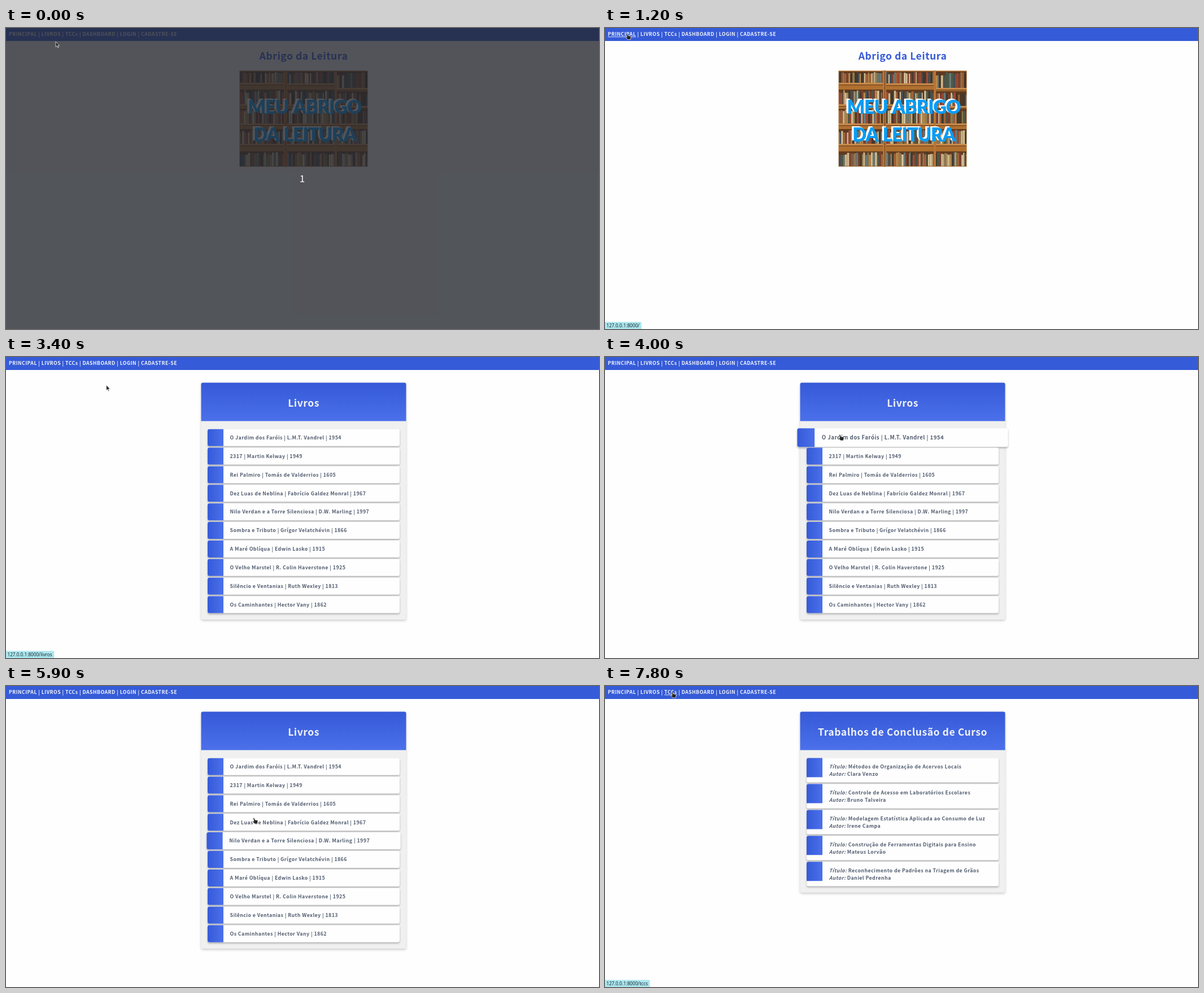
These frames come from a looping animation (1050 by 533 pixels, 8000 ms). An HTML page:

```html
<!DOCTYPE html>
<html lang="pt-BR">
<head>
<meta charset="utf-8">
<title>Abrigo da Leitura</title>
<style>
  html, body { margin: 0; width: 100%; height: 100%; overflow: hidden; background: #fefefe; }
  svg { display: block; }
  text { font: 600 8.75px "Noto Sans CJK JP", "Noto Sans CJK SC", sans-serif; letter-spacing: .45px; fill: #525d6f; white-space: pre; }
  .title { font-size: 17.5px; font-weight: 700; letter-spacing: .547px; text-anchor: middle; fill: #f0f2f7; }
  .home { fill: #3559d6; }
  #nav text { fill: #f2f4fb; }
  .cover { font: 900 33px Lato, sans-serif; letter-spacing: -1.2px; word-spacing: 3px; text-anchor: middle; fill: #fff; }
  .cover.front { fill: #0a9cf5; }
  .row { filter: drop-shadow(0 2px 1.5px rgba(0, 0, 0, .27)); }
  .panel { filter: drop-shadow(0 2px 2px rgba(0, 0, 0, .2)); }
  .count { font-size: 17px; font-weight: 400; text-anchor: middle; fill: #fff; }
  #status text { font: 400 8.2px "Noto Sans", sans-serif; letter-spacing: 0; fill: #1c2a30; }
  #cursor path { fill: #262626; stroke: #fff; stroke-width: .7; stroke-linejoin: round; }
</style>
</head>
<body>
<svg id="stage" width="1050" height="533" viewBox="0 0 1050 533"></svg>
<script>
const LOOP = 8000, TICK = 100, MID = 527;
const $ = id => document.getElementById(id);
const rect = (x, y, w, h, fill, rx = 0) =>
  `<rect x="${x}" y="${y}" width="${w}" height="${h}" rx="${rx}" fill="${fill}"/>`;
const text = (x, y, s, cls = '') => `<text x="${x}" y="${y}" class="${cls}">${s}</text>`;

const links = [['PRINCIPAL', 5, 55], ['LIVROS', 63, 97], ['TCCs', 105, 128],
  ['DASHBOARD', 135, 194], ['LOGIN', 201, 231], ['CADASTRE-SE', 238, 303]];

const books = [
  'O Jardim dos Faróis | L.M.T. Vandrel | 1954',
  '2317 | Martin Kelway | 1949',
  'Rei Palmiro | Tomás de Valderrios | 1605',
  'Dez Luas de Neblina | Fabrício Galdez Monral | 1967',
  'Nilo Verdan e a Torre Silenciosa | D.W. Marling | 1997',
  'Sombra e Tributo | Grígor Velatchévin | 1866',
  'A Maré Oblíqua | Edwin Lasko | 1915',
  'O Velho Marstel | R. Colin Haverstone | 1925',
  'Silêncio e Ventanias | Ruth Wexley | 1813',
  'Os Caminhantes | Hector Vany | 1862'];

const theses = [
  ['Métodos de Organização de Acervos Locais', 'Clara Venzo'],
  ['Controle de Acesso em Laboratórios Escolares', 'Bruno Talveira'],
  ['Modelagem Estatística Aplicada ao Consumo de Luz', 'Irene Campa'],
  ['Construção de Ferramentas Digitais para Ensino', 'Mateus Lorvão'],
  ['Reconhecimento de Padrões na Triagem de Grãos', 'Daniel Pedrenha']];

// Bookcase picture: three columns of shelves filled with seeded books
function bookcase() {
  let seed = 7;
  const rnd = () => (seed = seed * 16807 % 2147483647) / 2147483647;
  const tones = ['#7c4030', '#4d5a48', '#cdb98c', '#44505a', '#a0623a', '#d6c49c',
    '#4a3626', '#8f7c50', '#6b7a78', '#9c4a36', '#3c3a30', '#b5884e'];
  const columns = [[414, 492, 0], [498, 582, 1], [586, 640, 9]];
  const shelves = [97, 135, 169, 205, 244.5];
  let out = rect(413.5, 75.5, 227, 170, '#b0702f');
  for (const [x0, x1, drop] of columns) {
    shelves.forEach((base, k) => {
      const y = base + (k < 2 ? drop / (k * 2 + 1) : 0);
      const tall = k ? 26 : y - 77;
      out += rect(x0, y - tall, x1 - x0, tall, '#5f3a20');
      for (let x = x0; x < x1 - 1;) {
        const w = Math.min(1.8 + rnd() * 2.4, x1 - x), h = tall * (.75 + rnd() * .22);
        const tone = tones[Math.floor(rnd() * tones.length)];
        out += rect(x.toFixed(1), (y - h).toFixed(1), (w - .3).toFixed(1), h.toFixed(1), tone);
        x += w;
      }
      if (k < 4) out += rect(x0, y, x1 - x0, 3, '#c88a4a') + rect(x0, y + 3, x1 - x0, 1.5, '#7a4a22');
    });
  }
  return out + rect(492, 75.5, 6, 170, '#b87436') + rect(495, 75.5, 1, 170, '#70401d') +
    rect(582, 75.5, 4, 170, '#b87436');
}

const cover = (y, s) => text(525.5, y - 1.5, s, 'cover') + text(526.5, y - 1, s, 'cover') +
  text(529, y + .5, s, 'cover front');

const panel = (title, bottom) =>
  `<g class="panel">${rect(345.5, 45.5, 363, bottom - 45.5, '#f0f0f0', 3)}</g>
   <path d="M345.5 113.5V48.5q0-3 3-3H705.5q3 0 3 3V113.5Z" fill="url(#down)"/>` +
  text(MID, 87.5, title, 'title');

// A card centred on its own origin; r rounds the lower corner of the blue block
const card = (y, h, block, r, content) =>
  `<g class="row" transform="translate(${MID} ${y})">${rect(-170, -h / 2, 340, h, '#fefefe', 3)}
   <path d="M-142 ${-h / 2}h-25q-3 0-3 3v${block - 3 - r}q0 ${r} ${r} ${r}H-142Z" fill="url(#across)"/>
   ${content}</g>`;

const rowY = i => 142.7 + 32.88 * i;
const label = (y, name, s) =>
  `<text x="-130.3" y="${y}"><tspan font-style="italic">${name}:</tspan> ${s}</text>`;

const gradient = (id, dir) =>
  `<linearGradient id="${id}" ${dir}><stop stop-color="#365ad8"/><stop offset="1" stop-color="#4b70ea"/></linearGradient>`;

$('stage').innerHTML = `<defs>${gradient('down', 'x2="0" y2="1"')}${gradient('across', '')}</defs>` +
  rect(0, 0, 1050, 533, '#fefefe') +
  `<g id="nav">${rect(0, 0, 1050, 23, '#355bd8')}<text x="5" y="14.3">${
    links.map(([name]) => `<tspan>${name}</tspan>`).join(' | ')}</text></g>` +
  `<g id="home">${text(MID, 56, 'Abrigo da Leitura', 'title home')}${bookcase()}${
    cover(151.5, 'MEU ABRIGO')}${cover(200, 'DA LEITURA')}</g>` +
  `<g id="books">${panel('Livros', 465)}${
    books.map((s, i) => card(rowY(i), 30, 30, 3, text(-130.5, 3.2, s))).join('')}</g>` +
  `<g id="theses">${panel('Trabalhos de Conclusão de Curso', 365.7)}${
    theses.map(([s, who], i) => card(149.2 + 45.9 * i, 43.2, 34, 0,
      label(-3.1, 'Título', s) + label(10, 'Autor', who))).join('')}</g>` +
  `<g id="status"><path fill="#abe6ee"/><text x="2.5" y="530"></text></g>` +
  `<g id="shade">${rect(0, 0, 1050, 533, 'rgba(36,39,46,.79)')}${text(524.7, 273, '1', 'count')}</g>` +
  `<g id="cursor"><path id="arrow" d="M0 0V9.5L2.2 7.6 3.8 11 5.2 10.3 3.7 7.2H6.7Z"/>
   <path id="hand" d="M-.4 1Q.6-.5 1.7 1L2.9 3.9 6.6 4.6Q8.2 5 8 6.8L7 11H2.2L-1.2 7.2Q-1.4 5.9.2 6.2L1 6.6Z"/></g>`;

// Pointer path: time, x, y
const path = [[0, 88, 24], [100, 88, 9.5], [300, 88, 9.5], [500, 70, 5.5], [800, 38, 9.5],
  [1300, 38, 9.5], [1800, 76.5, 9.5], [3300, 76.5, 9.5], [3600, 380, 130], [4000, 415, 137],
  [4200, 418, 140], [4600, 424, 175], [4818, 429, 226], [4857, 430, 259], [5000, 433, 281],
  [5100, 436, 327], [5400, 442, 460], [5858, 440, 460], [5860, 438, 263], [5900, 438, 233],
  [6000, 438, 205], [6300, 430, 150], [6500, 350, 105], [6900, 143, 64], [7000, 140, 58],
  [7500, 118, 10]];

function pointer(t) {
  const k = path.findIndex(p => p[0] > t);
  if (k < 0) return path[path.length - 1].slice(1);
  const [t0, x0, y0] = path[k - 1], [t1, x1, y1] = path[k];
  const f = (t - t0) / (t1 - t0);
  return [x0 + (x1 - x0) * f, y0 + (y1 - y0) * f];
}

function rowAt([x, y]) {
  const i = Math.round((y - rowY(0)) / 32.88);
  return x > 357 && x < 697 && i >= 0 && i < 10 && Math.abs(y - rowY(i)) < 15 ? i : -1;
}

// Each row eases towards its hover state, replayed from the recent pointer path
function hoverLevels(t) {
  const levels = books.map(() => 0);
  for (let u = t - 700; u <= t; u += 5) {
    const over = rowAt(pointer(u - 35));
    levels.forEach((v, i) => levels[i] += ((i === over) - v) * .05);
  }
  return levels;
}

const statuses = [[0, null], [200, 'livros'], [500, null], [800, ''], [1500, null],
  [1700, 'livros'], [3500, null], [7700, 'tccs']];

const show = (id, on) => $(id).style.display = on ? '' : 'none';
const linkSpans = document.querySelectorAll('#nav tspan');
const bookRows = document.querySelectorAll('#books .row');

function showStatus(page) {
  show('status', page !== null);
  if (page === null) return;
  const [box, caption] = $('status').children;
  caption.textContent = '127.0.0.1:8000/' + page;
  const w = caption.getComputedTextLength() + 6;
  box.setAttribute('d', `M0 520.5H${w - 2}q2 0 2 2V533H0Z`);
}

function draw(t) {
  const page = t < 2500 ? 'home' : t < 7800 ? 'books' : 'theses';
  for (const id of ['home', 'books', 'theses']) show(id, id === page);
  show('shade', t < 100);
  showStatus(statuses.filter(s => s[0] <= t).pop()[1]);

  const [x, y] = pointer(t);
  const reloading = t >= 1100 && t < 1200;
  const link = y > 20 || reloading ? -1 : links.findIndex(l => x >= l[1] && x <= l[2]);
  linkSpans.forEach((s, i) => s.style.textDecoration = i === link ? 'underline' : 'none');

  const hand = link >= 0 || page === 'books' && rowAt([x, y]) >= 0;
  show('hand', hand);
  show('arrow', !hand);
  $('cursor').setAttribute('transform', `translate(${x} ${y})`);

  if (page === 'books') hoverLevels(t).forEach((v, i) =>
    bookRows[i].setAttribute('transform', `translate(${MID} ${rowY(i)}) scale(${1 + v / 10})`));
}

const start = performance.now();
let last = -1;
function frame() {
  const t = Math.floor((performance.now() - start) % LOOP / TICK) * TICK;
  if (t !== last) draw(last = t);
  requestAnimationFrame(frame);
}
frame();
</script>
</body>
</html>
```
